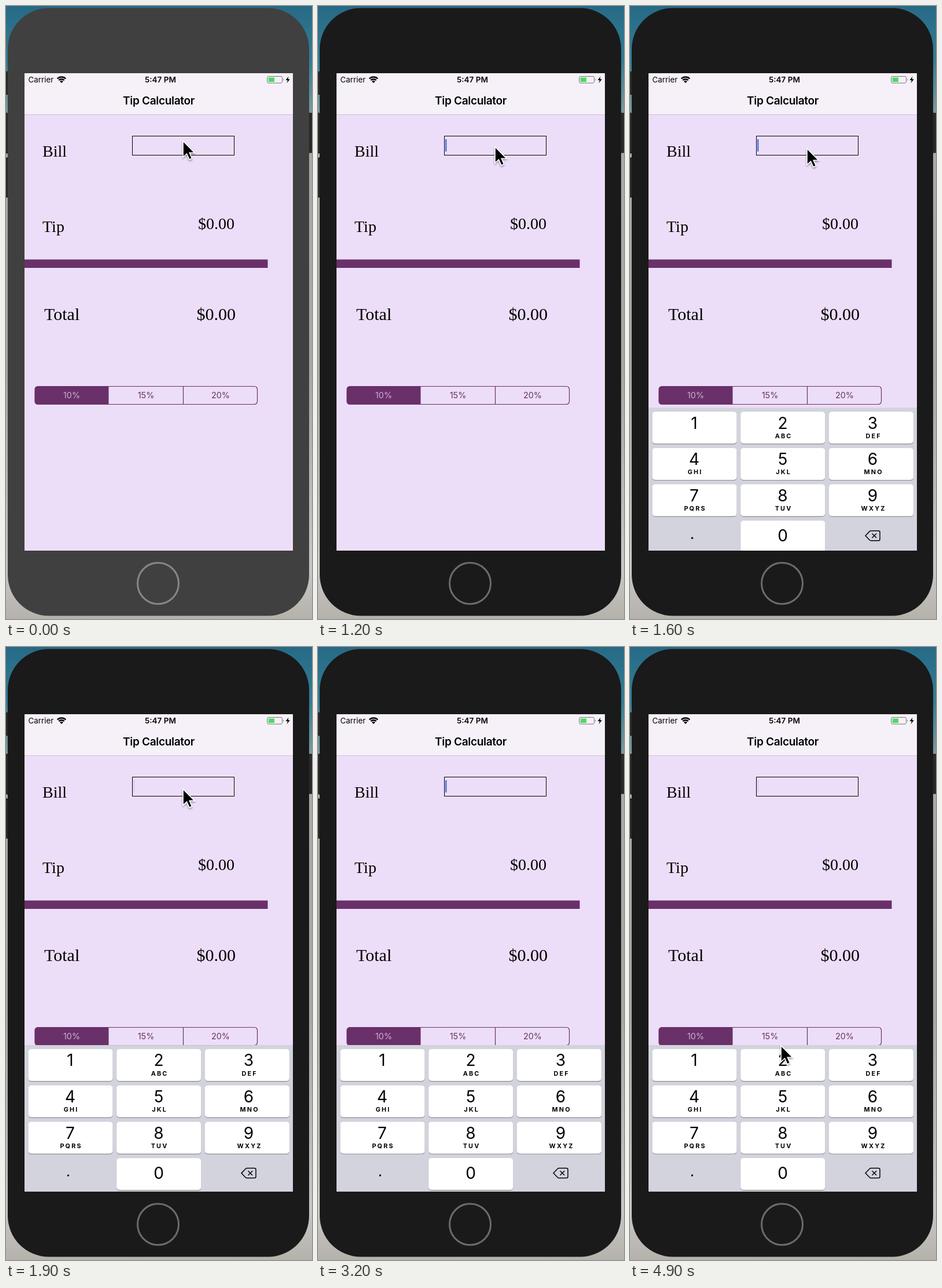
An HTML page that plays this animation: 529x1058 px, repeating every 5000 ms.

```html
<!DOCTYPE html>
<html lang="en">
<head>
<meta charset="utf-8">
<title>Tip Calculator</title>
<style>
  html, body { margin: 0; width: 100%; height: 100%; overflow: hidden; }
  svg { display: block; width: 100%; height: 100%; }
  text { font-family: Inter, Roboto, sans-serif; }
  .serif text { font-family: "Liberation Serif", serif; }
  .mid { text-anchor: middle; }
  .title { font-size: 19px; font-weight: 600; letter-spacing: -.3px; }
  .digit { font-size: 28px; text-anchor: middle; }
  .letters { font-size: 10.8px; font-weight: 700; letter-spacing: 2.2px; text-anchor: middle; }
</style>
</head>
<body>
<svg viewBox="0 0 529 1058" preserveAspectRatio="none">
  <defs>
    <linearGradient id="shore" x2="0" y2="1">
      <stop offset="0" stop-color="#276a86"/>
      <stop offset=".09" stop-color="#327d93"/>
      <stop offset=".17" stop-color="#7b979c"/>
      <stop offset=".24" stop-color="#aaa9a6"/>
      <stop offset=".6" stop-color="#a9a7a2"/>
      <stop offset=".92" stop-color="#c9c7c6"/>
      <stop offset="1" stop-color="#b5b2ab"/>
    </linearGradient>
    <clipPath id="screen"><rect x="32" y="116" width="464" height="824"/></clipPath>
    <filter id="shadow" x="-50%" y="-50%" width="200%" height="200%">
      <feDropShadow dx="0" dy="2" stdDeviation="1.6" flood-opacity=".4"/>
    </filter>
  </defs>

  <rect width="529" height="1058" fill="url(#shore)"/>
  <g fill="#29292a" stroke="#111">
    <rect x="-4" y="113.500" width="12" height="39"/>
    <rect x="-4" y="185" width="12" height="69"/>
    <rect x="-4" y="262" width="12" height="68"/>
    <rect x="520" y="185" width="14" height="68"/>
  </g>
  <rect id="body" x="3" y="3.500" width="521" height="1049" rx="71"/>
  <circle id="home" cx="263" cy="996.500" r="35.500" fill="none" stroke-width="3"/>

  <g clip-path="url(#screen)">
    <rect x="32" y="116" width="464" height="824" fill="#ecdef8"/>
    <rect x="32" y="116" width="464" height="71.500" fill="#f6f1f8"/>
    <path d="M32 187.500H496" stroke="#c9c0d0"/>

    <text x="38.500" y="132" font-size="13.400">Carrier</text>
    <g fill="none" stroke="#000" stroke-width="2.400">
      <path d="M88.700 125.500A10.300 10.300 0 0 1 103.300 125.500"/>
      <path d="M91.300 128.200A6.600 6.600 0 0 1 100.700 128.200"/>
    </g>
    <path d="M96 133L93.100 130.100A4.100 4.100 0 0 1 98.900 130.100Z"/>
    <text class="mid" x="267" y="132" font-size="13.500" font-weight="600">5:47 PM</text>
    <rect x="451.500" y="121.500" width="26" height="11.500" rx="2.500" fill="none" stroke="#777" />
    <rect x="453.500" y="123.500" width="10.500" height="7.500" fill="#4cd964"/>
    <path d="M479.200 125.200q2 2 0 4.200z" fill="#777"/>
    <path d="M488.500 121.500L483.500 128H486.800L485.600 133L490.800 126.200H487.400Z"/>
    <text class="mid title" x="264" y="169.500">Tip Calculator</text>

    <g class="serif" font-size="28">
      <text x="63" y="260">Bill</text>
      <text x="63" y="389.500">Tip</text>
      <text x="395" y="385" text-anchor="end">$0.00</text>
      <g font-size="30">
        <text x="66" y="542">Total</text>
        <text x="397" y="542" text-anchor="end">$0.00</text>
      </g>
    </g>
    <rect x="218.500" y="224.500" width="176" height="33" fill="none" stroke="#000"/>
    <rect id="caret" x="220" y="230" width="2.400" height="21" fill="#4a6ee0"/>
    <rect x="32" y="437.500" width="420.500" height="14.500" fill="#6a3069"/>

    <path d="M177.500 656.500H55a5 5 0 0 0-5 5V682.500a5 5 0 0 0 5 5H177.500Z" fill="#6a3069"/>
    <rect x="50" y="656.500" width="384.500" height="31" rx="5" fill="none" stroke="#6a3069" stroke-width="1.200"/>
    <path d="M306.500 656.500V687.500" stroke="#6a3069" stroke-width="1.200"/>
    <g class="mid" font-size="14.400" fill="#6a3069">
      <text x="113.500" y="677.300" fill="#cbaed2">10%</text>
      <text x="242" y="677.300">15%</text>
      <text x="371" y="677.300">20%</text>
    </g>

    <g id="keyboard">
      <rect x="32" width="464" height="260" fill="#d2d3dc"/>
      <circle cx="107.500" cy="225" r="1.700"/>
      <g fill="none" stroke="#000" stroke-width="1.500">
        <path d="M407 221L414.500 213.200Q415.500 212.500 417 212.500H429.500Q432 212.500 432 215V227Q432 229.500 429.500 229.500H417Q415.500 229.500 414.500 228.800Z"/>
        <path d="M418.500 217.200l7.600 7.600m0-7.600l-7.600 7.600"/>
      </g>
    </g>
  </g>

  <path id="pointer" d="M0 0V28L6.400 22L11 32L15.500 30L11.200 20.300H20Z" stroke="#fff" stroke-width="1.600" filter="url(#shadow)"/>
</svg>
<script>
const LOOP = 5000, STEP = 100;
const $ = id => document.getElementById(id);
const parts = { body: $('body'), home: $('home'), caret: $('caret'), keyboard: $('keyboard'), pointer: $('pointer') };

function add(tag, attrs, text = '') {
  const el = document.createElementNS(parts.body.namespaceURI, tag);
  for (const name in attrs) el.setAttribute(name, attrs[name]);
  el.textContent = text;
  parts.keyboard.append(el);
}

const letters = ['', 'ABC', 'DEF', 'GHI', 'JKL', 'MNO', 'PQRS', 'TUV', 'WXYZ'];
const labelX = [111, 264, 419.5];

function addKey(digit, col, row, label) {
  const box = { x: 38.5 + col * 152.7, width: 146, height: 55, rx: 5 };
  const y = 7 + row * 62.7;
  add('rect', { ...box, y: y + 1.2, fill: '#8b8c93' });
  add('rect', { ...box, y, fill: '#fff' });
  add('text', { class: 'digit', x: labelX[col], y: y + (label === undefined ? 36 : 29.3) }, digit);
  if (label) add('text', { class: 'letters', x: labelX[col] + 1.6, y: y + 45.5 }, label);
}
letters.forEach((label, i) => addKey(i + 1, i % 3, Math.floor(i / 3), label));
addKey(0, 1, 3);

// time, x, y of the pointer tip
const path = [[0, 306, 233], [500, 307, 225], [900, 307, 228], [1200, 306, 243],
  [1400, 306, 243], [1600, 306, 246], [2600, 306, 243], [3200, 306, 243]];
const HIDE = 3200, SHOW = 4900;

function pointerAt(t) {
  if (t >= SHOW) return [261, 688];
  const i = Math.max(1, path.findIndex(p => p[0] >= t));
  const [t0, x0, y0] = path[i - 1], [t1, x1, y1] = path[i];
  const k = (t - t0) / (t1 - t0);
  return [x0 + (x1 - x0) * k, y0 + (y1 - y0) * k];
}

// Critically damped spring from the bottom edge of the screen
function keyboardTop(t) {
  const s = Math.max(0, t - 1232) * 0.0152;
  return 687 + 253 * (1 + s) * Math.exp(-s);
}

// Opacity for each tenth of the one-second blink
const blink = [0, .4, 1, 1, 1, 1, 1, 1, .6, .13];

function draw(t) {
  parts.body.setAttribute('fill', t < 100 ? '#404040' : '#1a1a1a');
  parts.home.setAttribute('stroke', t < 100 ? '#878787' : '#6c6c6c');
  parts.keyboard.setAttribute('transform', `translate(0 ${keyboardTop(t)})`);
  parts.caret.setAttribute('opacity', t < 1200 ? 0 : blink[Math.floor(t % 1000 / 100)]);
  const hidden = t >= HIDE && t < SHOW;
  parts.pointer.setAttribute('visibility', hidden ? 'hidden' : 'visible');
  if (!hidden) parts.pointer.setAttribute('transform', `translate(${pointerAt(t)})`);
}

const start = performance.now();
function tick() {
  const t = (performance.now() - start) % LOOP;
  draw(Math.floor(t / STEP) * STEP);
  requestAnimationFrame(tick);
}
tick();
</script>
</body>
</html>
```
